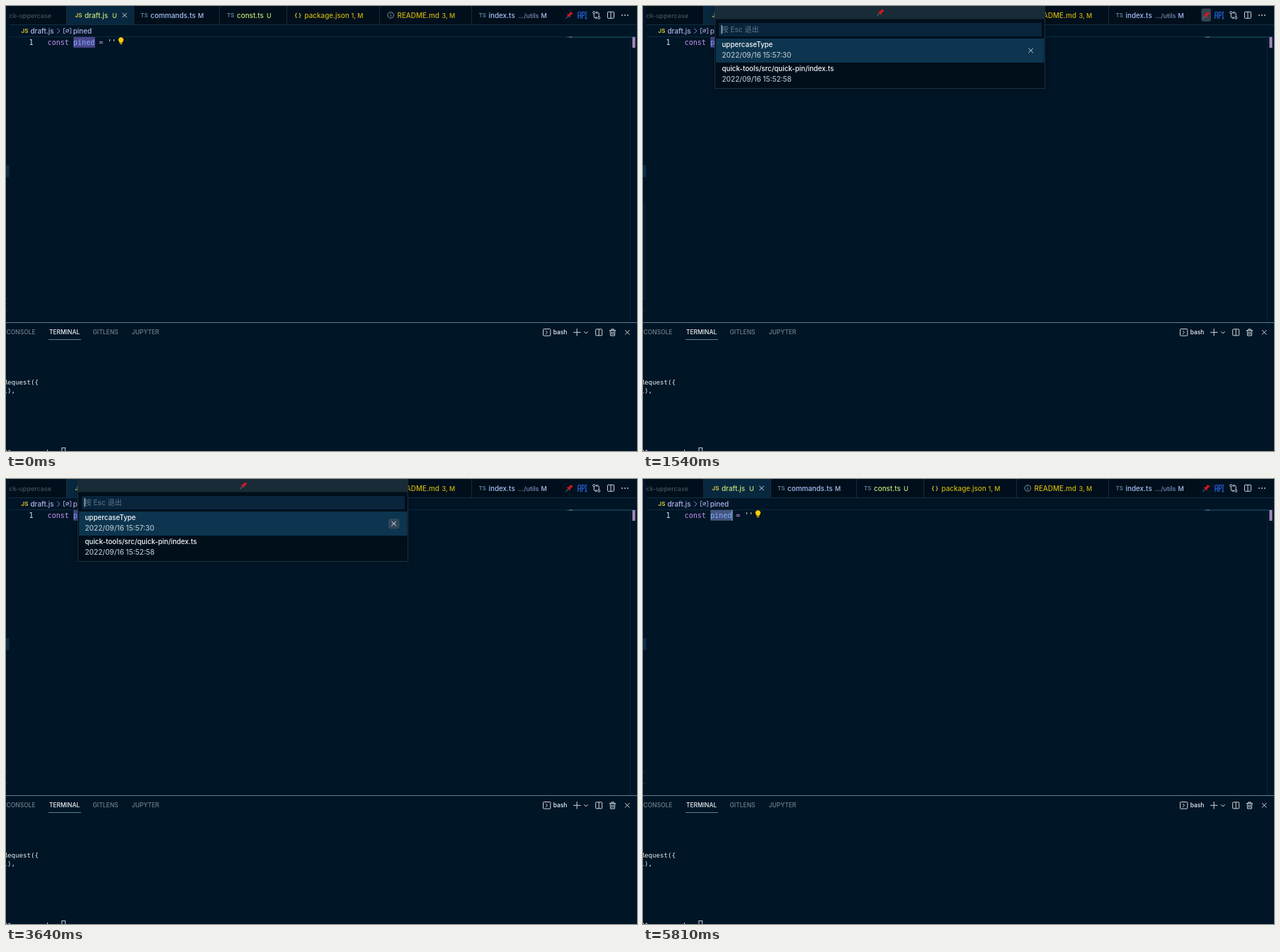
Recreate the animation shown at these times as an HTML page. Size 891 px wide and 629 px high, loop 5.88 s.

```html
<!DOCTYPE html>
<html lang="en">
<head>
<meta charset="utf-8">
<title>Pin list in a code editor</title>
<style>
html, body { margin: 0; width: 100%; height: 100%; overflow: hidden; background: #001526; }
svg { display: block; }
text { font-family: Inter, "Noto Sans CJK SC", "Noto Sans CJK", sans-serif; font-size: 9.9px; font-weight: 450; white-space: pre; }
.mono { font-family: "DejaVu Sans Mono", monospace; font-size: 10.07px; font-weight: 400; }
.term { font-family: "DejaVu Sans Mono", monospace; font-size: 9.15px; font-weight: 400; fill: #edf1f5; }
.small { font-size: 9px; }
.badge { font-size: 8px; font-weight: 600; }
.caps { font-size: 8.5px; fill: #71808d; }
.strong { font-size: 8.45px; font-weight: 500; fill: #eef2f5; }
.hint { font-size: 10px; font-weight: 400; fill: #62798c; }
.name { font-size: 9.75px; font-weight: 500; fill: #f8fafb; }
.date { font-size: 9.95px; fill: #b3c0ca; }
.line { fill: none; stroke: #ced6dd; stroke-width: 1; }
#picker { filter: drop-shadow(0 0 4px rgba(0, 0, 0, .28)); }
</style>
</head>
<body>
<svg id="stage" width="891" height="629" viewBox="0 0 891 629">
  <defs>
    <g id="pin">
      <path d="M-1.5 1.5L-4.8 4.8" stroke="#8b98a5" stroke-width=".9"/>
      <path d="M1.2-4.6Q2.2-5.2 3.4-4.2L4.6-3Q5.2-2 4.4-1.4L2.7-.9 1.3.7Q1.8 2.5.7 3.4L-3.6-.9Q-2.5-1.9-.8-1.5L.9-2.9Z" fill="#dc1a26"/>
      <path d="M1.6-3.6L3.6-1.7M-2.2-.6L.3 1.8" stroke="#8f0c1a" stroke-width=".7"/>
    </g>
    <path id="cross" d="M-3.2-3.2L3.2 3.2M3.2-3.2L-3.2 3.2"/>
    <g id="split">
      <rect x="-4.5" y="-4.5" width="9" height="9" rx=".8"/>
      <path d="M0-4.5V4.5"/>
    </g>
  </defs>
  <rect width="891" height="629" fill="#001526"/>

  <g id="tabs">
    <rect x="5" width="886" height="26" fill="#000f1b"/>
    <rect x="86" width="94" height="26" fill="#08283f"/>
    <rect x="786" width="105" height="26" fill="#001220"/>
    <path d="M85.5 0V26M180.5 0V26M301.5 0V26M396.5 0V26M527.5 0V26M657.5 0V26" stroke="#1a2b39"/>
    <path d="M5 26.5H891" stroke="#123043"/>
  </g>

  <rect y="225" width="4.5" height="17" fill="#0d2d42"/>
  <path d="M0 413.5H4.5M0 430.5H4.5" stroke="#102a3b"/>
  <rect id="strip" y="277" width="4.5" height="136" fill="#061b2d"/>

  <g id="tools">
    <rect id="pinHover" x="788.5" y="3.5" width="13.5" height="18.5" rx="3" fill="#34434f"/>
    <use href="#pin" x="795.3" y="13"/>
    <path d="M807.8 18V9.8Q807.8 8.5 809 8.5H810.2Q811.3 8.5 811.3 9.8V18M807.8 13.7H811.3M813.5 18V8.5H815Q816.4 8.5 816.4 10V12Q816.4 13.7 815 13.7H813.5M817.5 8.5H820.3M818.9 8.5V17.6M817.5 17.6H820.3" fill="none" stroke="#2864e4" stroke-width="1.15"/>
    <g class="line">
      <circle cx="830.3" cy="9.3" r="1.6"/>
      <circle cx="837.2" cy="16.7" r="1.6"/>
      <path d="M830.3 11V15Q830.3 16.7 832 16.7H834M832.6 15L834.3 16.7 832.6 18.4M837.2 15V11Q837.2 9.3 835.5 9.3H833.4M834.9 7.6L833.2 9.3 834.9 11"/>
      <use href="#split" x="854" y="12.8"/>
      <use href="#cross" x="167.5" y="13"/>
    </g>
    <g fill="#ced6dd">
      <circle cx="870" cy="13" r=".9"/><circle cx="874" cy="13" r=".9"/><circle cx="878" cy="13" r=".9"/>
    </g>
    <g fill="none" stroke="#8ba3b4" stroke-width=".9">
      <circle cx="543.2" cy="13" r="4.3"/><path d="M543.2 12.2V15.5M543.2 10.3V11.3"/>
    </g>
  </g>

  <g id="crumbs">
    <path d="M5 43.5H881" stroke="#0a2a3c"/>
    <path d="M72.3 31.8L76 35.3 72.3 38.8" fill="none" stroke="#8a91c4"/>
    <g fill="none" stroke="#a9a8e6" stroke-width=".9">
      <path d="M83.5 31.5H81.5V38.7H83.5M89.7 31.5H91.7V38.7H89.7M84.6 37.3L88.8 33"/>
      <circle cx="86.6" cy="35.1" r="2"/>
    </g>
  </g>

  <g id="editor">
    <rect id="selection" x="95.3" y="43.8" width="30.4" height="15"/>
    <rect id="caret" x="125.2" y="43.8" width="1.3" height="15" fill="#8fb0c8"/>
    <path d="M162.3 44.2C164.8 44.2 166 46 166 47.8C166 49.7 164.4 50.4 164.3 52H160.4C160.3 50.4 158.7 49.7 158.7 47.8C158.7 46 159.9 44.2 162.3 44.2Z" fill="#ffcc08"/>
    <path d="M160.6 53.4H164.1" stroke="#e6ba18" stroke-width="1.4"/>
    <rect x="791" y="43" width="98" height="1.8" fill="#123a52"/>
    <path d="M795 44H800" stroke="#6f8da4" stroke-width=".9"/>
    <path d="M881.5 43V447" stroke="#0a2638"/>
    <rect x="884.5" y="44" width="4" height="15" fill="#a58abb"/>
  </g>

  <g id="panel">
    <path d="M0 447.5H891" stroke="#5f7e97"/>
    <path d="M60 471.5H106" stroke="#5f7e97"/>
    <g class="line">
      <rect x="758.5" y="456.5" width="10.3" height="9.6" rx="1"/>
      <path d="M762 458.9L764.6 461.3 762 463.8"/>
      <path d="M801 461.3H811.5M806.2 456V466.5M816.2 460.2L819 462.8 821.8 460.2"/>
      <use href="#split" x="837.2" y="461.3"/>
      <path d="M852 458.5H861M854.8 458.3V456.8H858.2V458.3M853.2 458.5L853.6 466H859.4L859.8 458.5M855.4 460V464.5M857.6 460V464.5"/>
      <use href="#cross" x="877.3" y="461.3"/>
      <rect x="78.9" y="624.6" width="4.8" height="10"/>
    </g>
  </g>

  <g id="words"></g>

  <g id="picker">
    <rect id="frame" x="101.5" y="-2" width="466" fill="#010f1b" stroke="#1c303e"/>
    <rect x="102" y="0" width="465" height="18.5" fill="#182b37"/>
    <use href="#pin" x="335.3" y="9.3"/>
    <rect x="107" y="24" width="456" height="19" fill="#08253c"/>
    <rect x="103" y="46" width="463.5" height="34" fill="#0d354f"/>
    <rect id="closeHover" x="540" y="56" width="15.5" height="14.5" rx="3" fill="#304759"/>
    <use id="close" class="line" href="#cross" x="547.6" y="63"/>
    <g id="pickWords"></g>
    <rect id="inputCaret" x="110.5" y="27" width="1.1" height="12.5" fill="#c5d3df"/>
  </g>
</svg>
<script>
const LOOP = 5880;
const OPEN = 1540, REMOVE = 4410, SHUT = 4480;
const $ = id => document.getElementById(id);

function write(parent, x, y, str, fill, cls) {
  const el = document.createElementNS('http://www.w3.org/2000/svg', 'text');
  el.setAttribute('x', x);
  el.setAttribute('y', y);
  if (fill) el.setAttribute('fill', fill);
  if (cls) el.setAttribute('class', cls);
  el.textContent = str;
  parent.appendChild(el);
  return el;
}

const blue = '#a8c0f6', green = '#c5e478', gold = '#ccb30c', yellow = '#e8d63c';
const teal = '#5b8398', lilac = '#b2b4ee';

[
  [4.5, 16.5, 'ck-uppercase', '#40545f', 'small'],
  [97.5, 16, 'JS', yellow, 'badge'],
  [111, 16.7, 'draft.js', green],
  [150, 16.5, 'U', green, 'small'],
  [190, 16, 'TS', teal, 'badge'],
  [204, 16.7, 'commands.ts', blue],
  [271, 16.5, 'M', blue, 'small'],
  [312, 16, 'TS', teal, 'badge'],
  [326, 16.7, 'const.ts', green],
  [368, 16.5, 'U', green, 'small'],
  [407.5, 16, '{ }', yellow, 'badge'],
  [421.5, 16.7, 'package.json', gold],
  [487.5, 16.5, '1, M', gold, 'small'],
  [552.5, 16.7, 'README.md', gold],
  [615.5, 16.5, '3, M', gold, 'small'],
  [667.5, 16, 'TS', teal, 'badge'],
  [681.5, 16.7, 'index.ts', blue],
  [723, 16.5, '…/utils', '#7c90b8', 'small'],
  [755.5, 16.5, 'M', blue, 'small'],
  [21.5, 38, 'JS', yellow, 'badge'],
  [34.5, 38.7, 'draft.js', lilac],
  [94.7, 38.7, 'pined', lilac],
  [32.6, 54.7, '1', '#d2ebfd', 'mono'],
  [58.6, 54.7, 'const', '#c792f4', 'mono'],
  [95, 54.7, 'pined', '#82aaff', 'mono'],
  [131.3, 54.7, '=', '#c792f4', 'mono'],
  [143.4, 54.7, "''", '#d9f5dd', 'mono'],
  [.5, 464.4, 'CONSOLE', '', 'caps'],
  [61, 464.4, 'TERMINAL', '', 'strong'],
  [122.5, 464.4, 'GITLENS', '', 'caps'],
  [177.5, 464.4, 'JUPYTER', '', 'caps'],
  [772.7, 464.4, 'bash', '', 'strong'],
  [-3.5, 534.8, 'Request({', '', 'term'],
  [-3.5, 547.1, 'l),', '', 'term'],
  [-3.5, 633.6, '2$ yarn package', '', 'term']
].forEach(w => write($('words'), ...w));

const list = $('pickWords');
write(list, 110.8, 36.8, '按 Esc 退出', '', 'hint');
const rows = [0, 34].map(dy => [
  write(list, 111.5, 58.4 + dy, '', '', 'name'),
  write(list, 111.5, 72.5 + dy, '', '', 'date')
]);
const pins = [
  ['uppercaseType', '2022/09/16 15:57:30'],
  ['quick-tools/src/quick-pin/index.ts', '2022/09/16 15:52:58']
];

const show = (id, on) => $(id).setAttribute('visibility', on ? 'inherit' : 'hidden');
const within = (t, spans) => spans.some(([a, b]) => t >= a && t < b);

function draw(t) {
  const open = t >= OPEN && t < SHUT;
  const items = t < REMOVE ? pins : pins.slice(1);
  const caret = within(t, [[560, 1050], [1470, OPEN], [SHUT, 5040], [5530, LOOP]]);
  const closeHot = t >= 3150;

  show('caret', caret);
  $('selection').setAttribute('fill', caret ? '#435680' : '#4a478c');
  show('pinHover', t >= 1470 && t < 2520);
  show('strip', t >= OPEN && t < 1680);

  $('picker').setAttribute('visibility', open ? 'visible' : 'hidden');
  $('frame').setAttribute('height', 50.5 + 34 * items.length);
  rows.forEach((row, i) => row.forEach((el, j) => {
    el.textContent = items[i] ? items[i][j] : '';
  }));
  show('inputCaret', within(t, [[OPEN, 2100], [2590, 3080], [3570, 4200]]));
  show('closeHover', closeHot);
  $('close').style.stroke = closeHot ? '#f0f4f7' : '#ced6dd';
}

const start = performance.now();
function tick() {
  draw((performance.now() - start) % LOOP);
  requestAnimationFrame(tick);
}
tick();
</script>
</body>
</html>
```
